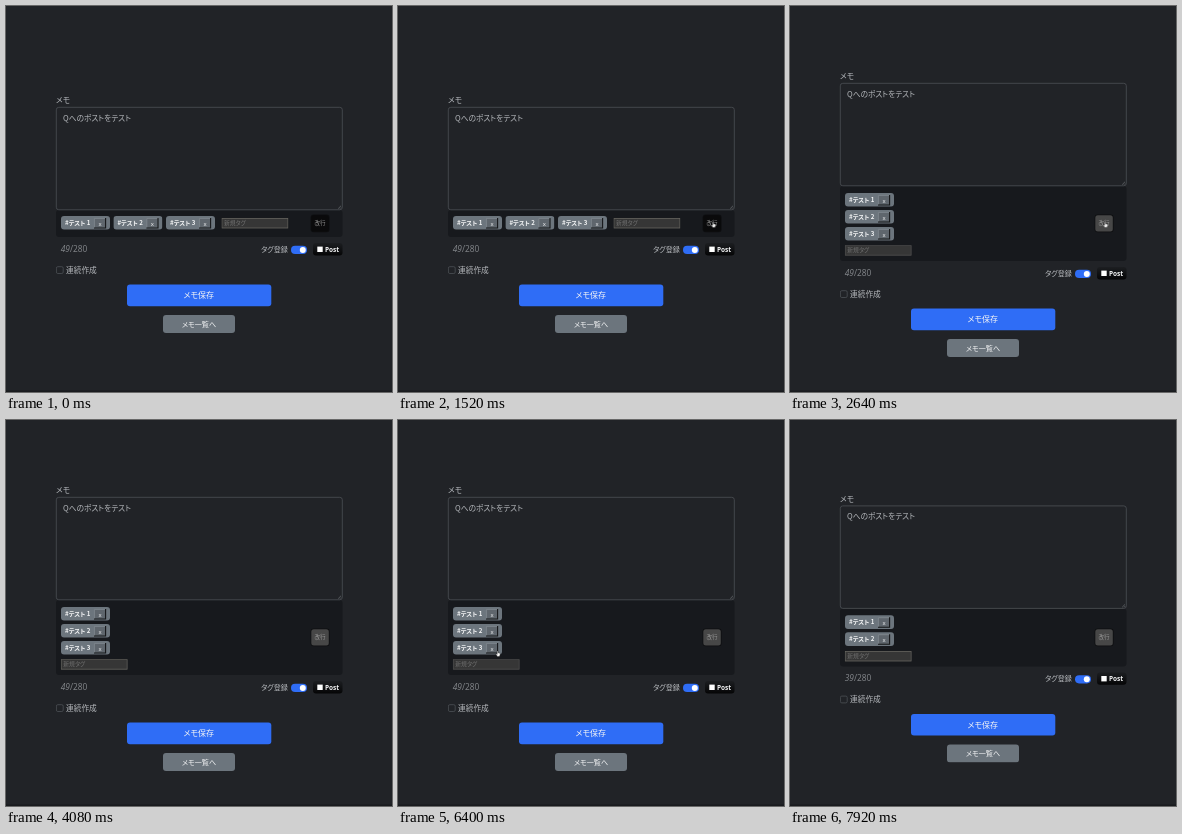
Recreate the animation shown at these times as an HTML page. Size 386 by 386 pixels, loop 8 s.

```html
<!DOCTYPE html>
<html lang="ja">
<head>
<meta charset="utf-8">
<title>メモ</title>
<style>
  html, body { margin: 0; height: 100%; overflow: hidden; background: #212327; }
  svg { display: block; width: 100vw; height: 100vh; }
  text {
    font-family: "Noto Sans CJK JP", "Noto Sans CJK", sans-serif;
    font-feature-settings: "palt";
    font-size: 7.7px;
    fill: #b6b9bd;
  }
  .mid { text-anchor: middle; }
  .white { fill: #f4f5f6; }
  .latin { font-family: "Open Sans", sans-serif; }
  .name { font-size: 6.2px; font-weight: 700; }
  .count { font-size: 8.4px; fill: #85888c; }

  /* --a: one row, --b: stacked, --c: stacked with a tag removed */
  .move { animation: layout 8s step-end infinite; }
  @keyframes layout {
    0% { transform: translate(var(--a)); }
    20% { transform: translate(var(--b)); }
    95%, 100% { transform: translate(var(--c)); }
  }
  .top { --a: 0, 0; --b: 0, -24px; --c: 0, -15.4px; }
  .bottom { --a: 0, 0; --b: 0, 24px; --c: 0, 15.4px; }
  .tag1 { --a: 55px, 210px; --b: 55px, 187px; --c: 55px, 195.3px; }
  .tag2 { --a: 107.4px, 210px; --b: 55px, 204px; --c: 55px, 212.3px; }
  .tag3 { --a: 160px, 210px; --b: 55px, 221px; --c: 55px, 500px; }
  .field { --a: 215.5px, 212px; --b: 54.8px, 239.2px; --c: 54.8px, 231px; }

  .bar { animation: bar 8s step-end infinite; }
  @keyframes bar {
    0% { y: 204px; height: 27px; }
    20% { y: 180px; height: 75px; }
    95%, 100% { y: 188.6px; height: 57.8px; }
  }

  .field rect { animation: field 8s step-end infinite; }
  @keyframes field {
    0% { stroke: #67655f; }
    20% { stroke: #525150; }
    48% { stroke: #67655f; }
    58% { stroke: #525150; }
    95%, 100% { stroke: #67655f; }
  }

  .wrap { animation: wrap 8s linear infinite; }
  @keyframes wrap {
    0%, 20% { fill: #0a0a0b; }
    27%, 100% { fill: #474747; }
  }

  .before { animation: before 8s step-end infinite; }
  .after { animation: after 8s step-end infinite; }
  @keyframes before { 0% { visibility: visible; } 95%, 100% { visibility: hidden; } }
  @keyframes after { 0% { visibility: hidden; } 95%, 100% { visibility: visible; } }

  .cursor { fill: #fff; stroke: #111; stroke-width: .35; animation: cursor 8s ease-in-out infinite; }
  @keyframes cursor {
    0%, 7% { transform: translate(376.5px, 280px); }
    17%, 42% { transform: translate(313.5px, 216px); }
    49%, 51% { transform: translate(112px, 243px); }
    61%, 100% { transform: translate(98px, 231px); }
  }
  .arrow { animation: arrow 8s step-end infinite; }
  .hand { animation: hand 8s step-end infinite; }
  @keyframes arrow {
    0% { visibility: hidden; }
    3% { visibility: visible; }
    16% { visibility: hidden; }
    42.5% { visibility: visible; }
    48% { visibility: hidden; }
    58% { visibility: visible; }
    61%, 100% { visibility: hidden; }
  }
  @keyframes hand {
    0% { visibility: hidden; }
    16% { visibility: visible; }
    42.5% { visibility: hidden; }
    61% { visibility: visible; }
    95%, 100% { visibility: hidden; }
  }
</style>
</head>
<body>
<svg viewBox="0 0 386 386">
  <defs>
    <g id="tag">
      <rect width="49" height="13.6" rx="3" fill="#6c757d"/>
      <rect x="33" y="2" width="12" height="10.4" fill="#5f666d"/>
      <path d="M33.4 12V2.4H45" fill="none" stroke="#858c93" stroke-width=".8"/>
      <path d="M33 12H44.6V2" fill="none" stroke="#16181a" stroke-width="1.1"/>
      <text class="white mid latin" x="39" y="9.6" style="font-size:6px">x</text>
    </g>
    <linearGradient id="shade" x2="0" y2="1">
      <stop stop-color="#1c1e21"/>
      <stop offset="1" stop-color="#050506"/>
    </linearGradient>
  </defs>

  <rect width="386" height="386" fill="#212327"/>
  <rect y="384.5" width="386" height="1.5" fill="#191b1e"/>

  <rect class="bar" x="50" y="204" width="286.5" height="27" rx="3" fill="#17191d"/>

  <g class="move top">
    <text x="50" y="97">メモ</text>
    <rect x="50.3" y="101.3" width="286" height="102.5" rx="2.5" fill="#212327" stroke="#4d5156" stroke-width=".8"/>
    <text x="57" y="114.7">Qへのポストをテスト</text>
    <path d="M332.2 202.6l2.8-2.8M334 202.6l1-1" stroke="#8b8e92" stroke-width=".5"/>
  </g>

  <g class="move tag1">
    <use href="#tag"/>
    <text class="white name" x="4" y="9.2">#テスト 1</text>
  </g>
  <g class="move tag2">
    <use href="#tag"/>
    <text class="white name" x="4" y="9.2">#テスト 2</text>
  </g>
  <g class="move tag3">
    <use href="#tag"/>
    <text class="white name" x="4" y="9.2">#テスト 3</text>
  </g>

  <g class="move field">
    <rect x=".4" y=".4" width="66" height="9.6" fill="#363636" stroke-width=".8"/>
    <text x="2.5" y="7.3" style="font-size:5.8px;fill:#6f6f6f">新規タグ</text>
  </g>

  <rect x="304.6" y="208.6" width="19" height="17.6" rx="3" fill="#0e0f11"/>
  <rect class="wrap" x="305.3" y="209.2" width="17.5" height="16.2" rx="2.5"/>
  <text class="mid" x="314" y="219.3" style="font-size:5.5px;fill:#9a9a9a">改行</text>

  <g class="move bottom">
    <text class="latin count before" x="54.7" y="245.7"><tspan font-style="italic">49</tspan>/280</text>
    <text class="latin count after" x="54.7" y="245.7"><tspan font-style="italic">39</tspan>/280</text>
    <text x="255" y="245.6" style="font-size:7.1px">タグ登録</text>
    <rect x="285" y="239.8" width="16" height="8.2" rx="4.1" fill="#2f6df6"/>
    <circle cx="296.8" cy="243.9" r="3" fill="#fff"/>
    <rect x="307" y="237" width="29.5" height="12.4" rx="3" fill="url(#shade)"/>
    <rect x="311.3" y="240.6" width="5.4" height="5.4" fill="#fff"/>
    <text class="latin white" x="319" y="245.7" style="font-size:6.5px" font-weight="700">Post</text>

    <rect x="50.4" y="260.7" width="6.8" height="6.8" rx="1.4" fill="none" stroke="#4d5156" stroke-width=".8"/>
    <text x="60" y="266.8">連続作成</text>

    <rect x="121" y="278.6" width="144.3" height="21.6" rx="3" fill="#2f6df6"/>
    <text class="mid white" x="192.8" y="292.3" style="font-size:8px">メモ保存</text>
    <rect x="157" y="309" width="72" height="18" rx="3" fill="#6c757d"/>
    <text class="mid white" x="193" y="320.6" style="font-size:7.1px">メモ一覧へ</text>
  </g>

  <g class="cursor">
    <path class="arrow" d="M0 0v4.5l1.1-1 .8 1.7.8-.4-.8-1.6h1.5z"/>
    <path class="hand" d="M1.2 0h.9v1.8l2 .5v1.7l-.8 1.4h-2L0 3.2l.5-.4.7.6z"/>
  </g>
</svg>
</body>
</html>
```
